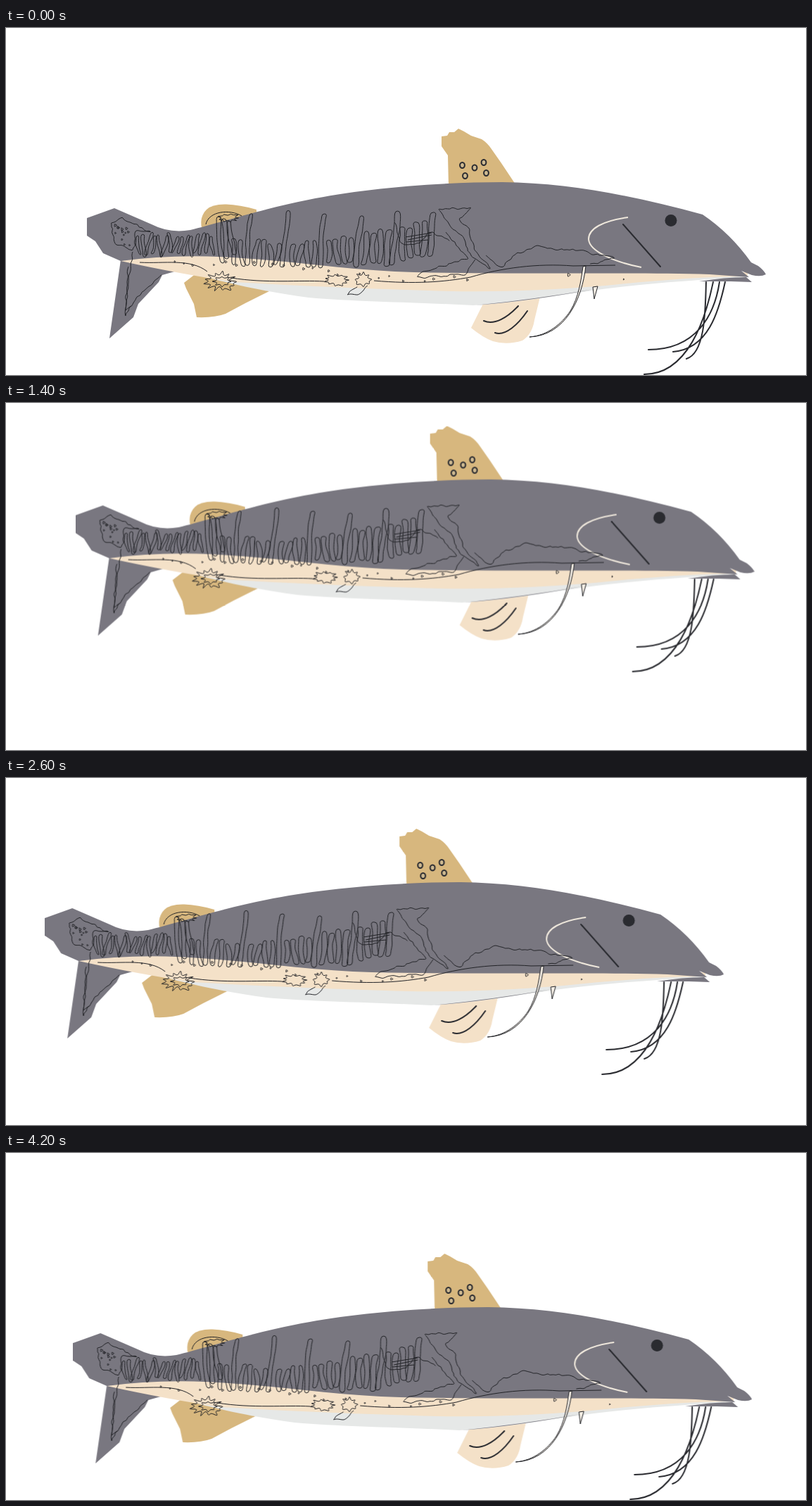
Recreate the animation shown at these times as an HTML page. Size 1137 by 493 pixels, loop 4400 ms.

```html
<!DOCTYPE html>
<html lang="en">
<head>
<meta charset="utf-8">
<title>Swimming catfish</title>
<style>
  html, body { margin: 0; width: 100%; height: 100%; overflow: hidden; background: #fff; }
  svg { display: block; width: 1137px; height: 493px; }
  #fish { animation: swim 4.4s infinite; }
  @keyframes swim {
    0% { transform: translate(0, 0); animation-timing-function: steps(9); }
    40.90909% { transform: translate(-21px, -142px); animation-timing-function: steps(8); }
    77.27273% { transform: translate(-98.5px, 0); animation-timing-function: steps(5); }
    100% { transform: translate(0, 0); }
  }
  .skin { fill: #797780; }
  .gold { fill: #d7b77e; }
  .cream { fill: #f4e1c8; }
  .pale { fill: #e6e8e7; }
  .ink { fill: none; stroke: #2a2b30; stroke-width: 2; stroke-linecap: round; }
  .fine, #marks { fill: none; stroke: #222327; stroke-width: 1; stroke-linejoin: round; }
</style>
</head>
<body>
<svg viewBox="0 0 1137 493">
  <g id="fish">
    <!-- fins -->
    <path class="gold" d="M629 224L628 181 619 168V154L627 153 630 148 637 148 643 143 651 147 661 153 676 158Q684 163 690 172L704 192 712 204 724 222Z"/>
    <path class="gold" d="M278 284Q275 268 285 258Q293 250 313 250.500Q332 251 356 258V270L300 285Z"/>
    <path class="gold" d="M253 362L275 345 380 368 376 373 340 391 312 406Q296 412 271 411L267 392 256 370Z"/>
    <path class="cream" d="M679 390L661 426Q678 440 692 445Q712 451 734 444Q748 435 751 415L759 382Z"/>
    <path class="skin" d="M163 330L147 441 181 411 188 392 217 361 222 351 243 345Z"/>
    <!-- belly -->
    <path class="pale" d="M225 338C285 354 340 371 430 383C500 389 590 390 664 394C720 391 780 381 840 372C910 363 975 358 1057 354L700 340Z"/>
    <path class="skin" d="M667 394Q745 388 835 371Q755 385 667 394Z"/>
    <path class="cream" d="M163 331Q225 320 300 320L1054 347V353C985 353 910 360 840 367C760 373 690 376 600 373C500 370 410 366 325 361Q250 350 163 331Z"/>
    <!-- back and jaw -->
    <path class="skin" d="M115 270L154 256 207 279Q232 292 262 287C300 278 360 258 430 244C500 229 610 219 705 219C800 220 890 238 990 265Q1030 292 1059 333L1069 338Q1077 344 1080 350Q1073 354 1060 351L1045 345 1056 354 1000 350C880 347 720 350 580 347C500 345 420 333 350 328Q250 319 163 331L138 320 127 303 115 295Z"/>
    <path class="skin" d="M985 360Q1022 354 1052 354L1060 361 1030 360Z"/>
    <!-- gill and eye -->
    <path d="M884 269C848 274 828 285 828 300C829 318 867 333 903 340" fill="none" stroke="#efe8dc" stroke-width="2"/>
    <path class="ink" d="M877 279L930 339"/>
    <circle cx="945" cy="273.500" r="8.500" fill="#2a2b30"/>
    <!-- fin details -->
    <g class="ink" style="fill:#cfba91">
      <ellipse cx="648.500" cy="195" rx="3.400" ry="4"/>
      <ellipse cx="652.500" cy="210" rx="3.400" ry="4"/>
      <ellipse cx="666" cy="198.500" rx="3.400" ry="4"/>
      <ellipse cx="679" cy="191" rx="3.400" ry="4"/>
      <ellipse cx="682.500" cy="206" rx="3.400" ry="4"/>
    </g>
    <path class="ink" d="M679 416C694 423 713 411 728 395M695 433C710 438 728 421 741 402"/>
    <path class="fine" style="fill:#f4eee5" d="M824 338C819 385 795 437 744 439C770 437 790 420 802 402C814 382 817 360 820 339ZM834 368L841 367 836 385Z"/>
    <!-- barbels -->
    <path class="ink" d="M1005 361C994 414 969 492 907 492M1014 361C1007 408 981 457 913 457M1022 361C1013 403 998 456 948 460M995 361C994 400 994 462 967 470"/>
    <g id="marks">
      <path d="M284 279C288 260 318 257 335 267M568 297L605 291M571 301L605 294M569 304L600 301"/>
      <path d="M190 333C225 335 262 327 286 346M320 355C370 363 418 358 452 360M523 359C580 364 622 361 660 354C704 341 755 334 806 338L866 337"/>
    </g>
  </g>
</svg>
<script>
const marks = document.getElementById("marks");
let seed = 11;

function rand() {
  seed = (seed * 16807) % 2147483647;
  return seed / 2147483647;
}
const jitter = amount => (rand() - 0.5) * 2 * amount;
const between = (a, b) => a + rand() * (b - a);

// Lower edge of the dark back.
function edge(x) {
  const t = Math.min(1, Math.max(0, (x - 320) / 240));
  return 325 + 22 * t * t * (3 - 2 * t);
}

function draw(pts, closed) {
  const at = p => p.map(v => v.toFixed(1)).join(" ");
  const mid = (a, b) => [(a[0] + b[0]) / 2, (a[1] + b[1]) / 2];
  let d = "M" + at(closed ? mid(pts[pts.length - 1], pts[0]) : pts[0]);
  pts.forEach((p, i) => {
    d += "Q" + at(p) + " " + at(mid(p, pts[i + 1] || (closed ? pts[0] : p)));
  });
  const path = document.createElementNS("http://www.w3.org/2000/svg", "path");
  path.setAttribute("d", d + (closed ? "Z" : ""));
  marks.append(path);
}

// Joins a few key points with a shaky line.
function line(text, amount = 1.5, closed = false) {
  const pts = text.split(" ").map(pair => pair.split(",").map(Number));
  if (closed) pts.push(pts[0]);
  const out = [pts[0]];
  for (let i = 1; i < pts.length; i++) {
    const [x0, y0] = pts[i - 1], [x1, y1] = pts[i];
    const n = Math.ceil(Math.hypot(x1 - x0, y1 - y0) / 5);
    for (let k = 1; k <= n; k++) {
      out.push([x0 + (x1 - x0) * k / n + jitter(amount), y0 + (y1 - y0) * k / n + jitter(amount)]);
    }
  }
  draw(out, closed);
}

// A closed, slightly uneven upright finger.
function worm(x, top, bottom, width, lean) {
  const left = [], right = [];
  const n = Math.ceil((bottom - top) / 8);
  const phase = rand() * 6;
  for (let i = 0; i <= n; i++) {
    const t = i / n;
    const cx = x + lean * (0.5 - t) + Math.sin(phase + t * 5) * 1.5;
    const w = width / 2 + jitter(0.8);
    left.push([cx - w, top + (bottom - top) * t]);
    right.unshift([cx + w, top + (bottom - top) * t]);
  }
  draw([...left, ...right], true);
}

// A frayed closed outline.
function tuft(cx, cy, rx, ry, spikes) {
  const pts = [];
  for (let i = 0; i < spikes * 2; i++) {
    const a = i / spikes * Math.PI;
    const r = i % 2 ? between(0.3, 0.7) : between(0.9, 1.2);
    pts.push([cx + Math.cos(a) * rx * r, cy + Math.sin(a) * ry * r]);
  }
  draw(pts, true);
}

const spot = (x, y, r) => tuft(x, y, r, r, 3);

// flank stripes: every fifth one is tall
for (let i = 0; i < 28; i++) {
  const x = 324 + i * 10.4;
  const tall = i % 5 === 2;
  const top = tall ? 263 : 303 - Math.max(0, x - 450) * 0.18;
  const bottom = 337 - Math.max(0, x - 540) * 0.25;
  worm(x, top + jitter(4), bottom + jitter(4), 5.5 + i / 12, tall ? 7 : jitter(6));
}

// tail patch
line("149,277 164,270 207,290 183,289 182,318 154,306", 2, true);
for (let i = 0; i < 13; i++) spot(between(155, 182), between(278, 310), between(1, 2.5));
for (let x = 188; x < 295; x += 7.5) worm(x, 293 + jitter(4), 322 + jitter(4), 4, jitter(9));
line("180,318 175,356 169,410 183,386 207,364 221,350");
line("174,339 172,366 170,402 177,394");

// patch below the small back fin
tuft(317, 270, 17, 7, 9);
for (let i = 0; i < 3; i++) worm(304 + i * 8, 268 + i * 3, 334 - i * 6, 6, -6);

// shoulder patch
line("616,257 661,256 643,270 657,284 667,318 690,342 660,325 651,300 624,271", 2, true);
line("625,290 657,327 593,347 583,355 652,350 666,330", 2);
line("552,276 563,309 585,307 603,289 632,302", 2);

// ragged edge behind the gill
line("682,323 704,341 728,320 757,308 775,314 815,315 835,321 866,327 830,336", 2);

// belly
tuft(305, 360, 25, 15, 13);
tuft(307, 360, 14, 8, 8);
tuft(470, 358, 20, 9, 11);
tuft(508, 357, 14, 11, 8);
line("514,366 502,378 485,379 488,374 500,368", 1);
for (let x = 240; x < 660; x += between(12, 32)) spot(x, edge(x) + between(5, 13), between(1.2, 2.4));
spot(800, 351, 3);
spot(878, 357, 1.3);
</script>
</body>
</html>
```
